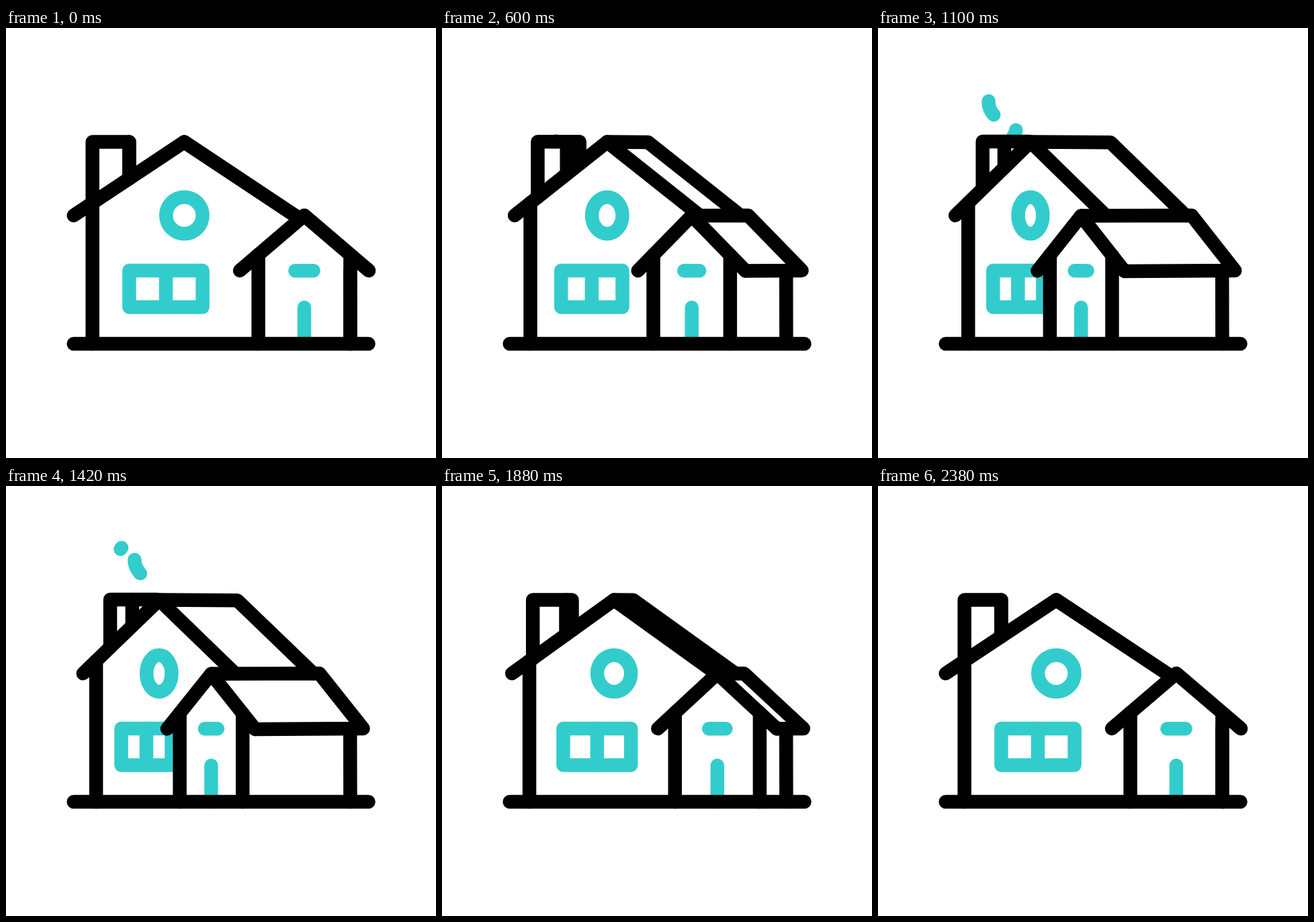
Animation, 640 px wide and 640 px high, one loop 2400 ms. Source, as an HTML page with a canvas:

```html
<!DOCTYPE html>
<html lang="en">
<head>
<meta charset="utf-8">
<title>House</title>
<style>
html, body { margin: 0; width: 100%; height: 100%; overflow: hidden; background: #fff; }
canvas { display: block; width: 640px; height: 640px; }
</style>
</head>
<body>
<canvas id="stage" width="640" height="640"></canvas>
<script>
const ctx = document.getElementById('stage').getContext('2d');
const LOOP = 2400, BLACK = '#000', TEAL = '#33cccc';
const GROUND = 470, RIDGE = 169.6, EAVE = 279, SHED_EAVE = 361;

const clamp = v => Math.max(0, Math.min(1, v));
const smooth = v => { const s = clamp(v); return s * s * (3 - 2 * s); };

// Symmetric cubic-bezier(a, 0, 1 - a, 1), solved by bisection
function ease(x, a = 0.78) {
  x = clamp(x);
  let lo = 0, hi = 1;
  for (let i = 0; i < 30; i++) {
    const s = (lo + hi) / 2, r = 1 - s;
    if (3 * r * r * s * a + 3 * r * s * s * (1 - a) + s * s * s < x) lo = s;
    else hi = s;
  }
  return smooth((lo + hi) / 2);
}

const turnAt = t => t < 1190 ? ease(t / 1198) : 1 - ease((t - 1190) / 1200);

function stroke(color, ...points) {
  ctx.strokeStyle = color;
  ctx.beginPath();
  points.forEach(([x, y], i) => i ? ctx.lineTo(x, y) : ctx.moveTo(x, y));
  ctx.stroke();
}

function cubic(p, s) {
  const r = 1 - s;
  const at = k => r * r * r * p[0][k] + 3 * r * r * s * p[1][k] + 3 * r * s * s * p[2][k] + s * s * s * p[3][k];
  return [at(0), at(1)];
}

const LOWER = [[169, 169.5], [182, 154], [182, 140], [173, 130]];
const UPPER = [[173, 130], [162, 118], [162, 104], [172, 92]];
const smokePoint = u => u < 0.5 ? cubic(LOWER, u * 2) : cubic(UPPER, u * 2 - 1);

function smoke(t, start, dx) {
  const head = smooth((t - start) / 800), tail = smooth((t - start - 145) / 810);
  if (head - tail < 0.002) return;
  const points = [];
  for (let i = 0; i <= 40; i++) {
    const [x, y] = smokePoint(tail + (head - tail) * i / 40);
    points.push([x + dx, y]);
  }
  stroke(TEAL, ...points);
}

function draw(t) {
  const p = turnAt(t);
  const mix = (a, b) => a + (b - a) * p;

  ctx.fillStyle = '#fff';
  ctx.fillRect(0, 0, 640, 640);
  ctx.lineWidth = 20.5;
  ctx.lineCap = ctx.lineJoin = 'round';

  smoke(t, 545, 0);
  smoke(t, 872, 26.8);

  // Round and square windows
  ctx.strokeStyle = TEAL;
  ctx.beginPath();
  ctx.ellipse(mix(265.4, 226.8), EAVE, mix(27.2, 18.4), 27.2, 0, 0, Math.PI * 2);
  ctx.stroke();
  const winL = mix(183.4, 171.2), winM = mix(238, 208.2), winR = 2 * winM - winL;
  ctx.strokeRect(winL, 361, winR - winL, 54.6);
  stroke(TEAL, [winM, 361], [winM, 415.6]);

  // Door and sign
  const shedX = mix(444, 301.6), sign = mix(13.6, 9.4);
  stroke(TEAL, [shedX - sign, 361.2], [shedX + sign, 361.2]);
  stroke(TEAL, [shedX, 416], [shedX, GROUND]);

  // House
  const apex = mix(265.3, 226.9), tip = mix(100.7, 115.2), half = apex - tip;
  const back = mix(265.3, 346.3), backY = RIDGE + 0.6 * p;
  const roofY = x => EAVE - (x - tip) * (EAVE - RIDGE) / half;
  const wall = mix(128.7, 134.3);
  stroke(BLACK, [tip, EAVE], [apex, RIDGE], [apex + half, EAVE]);
  stroke(BLACK, [apex, RIDGE], [back, backY], [back + half, EAVE]);
  stroke(BLACK, [wall, roofY(wall)], [wall, GROUND]);

  // Chimney
  const left = mix(128.7, 155.8), mid = mix(183.4, 188), rear = mix(183.4, 225.5);
  const top = RIDGE - 0.6 * p;
  stroke(BLACK, [left, roofY(left)], [left, top], [rear, top], [rear, roofY(rear)]);
  stroke(BLACK, [mid, top], [mid, roofY(mid)]);

  // Shed
  const eaveL = mix(348, 237), eaveR = 2 * shedX - eaveL, eaveY = SHED_EAVE + p;
  const peak = [shedX, EAVE + 0.6 * p], corner = [eaveR, eaveY];
  const wallL = mix(375.6, 255.4), wallR = 2 * shedX - wallL;
  const wallTop = eaveY - (wallL - eaveL) * (eaveY - peak[1]) / (shedX - eaveL);
  stroke(BLACK, [eaveL, SHED_EAVE + 0.4 * p], peak, corner);
  stroke(BLACK, peak, [mix(444, 467), EAVE], [mix(540, 531.3), SHED_EAVE], corner);
  for (const x of [wallL, wallR]) stroke(BLACK, [x, wallTop], [x, GROUND]);
  stroke(BLACK, [512.2, SHED_EAVE], [512.4, GROUND]);

  stroke(BLACK, [100.7, GROUND], [539.5, GROUND]);
}

const begin = performance.now();
function frame() {
  draw((performance.now() - begin) % LOOP);
  requestAnimationFrame(frame);
}
draw(0);
requestAnimationFrame(frame);
</script>
</body>
</html>
```
